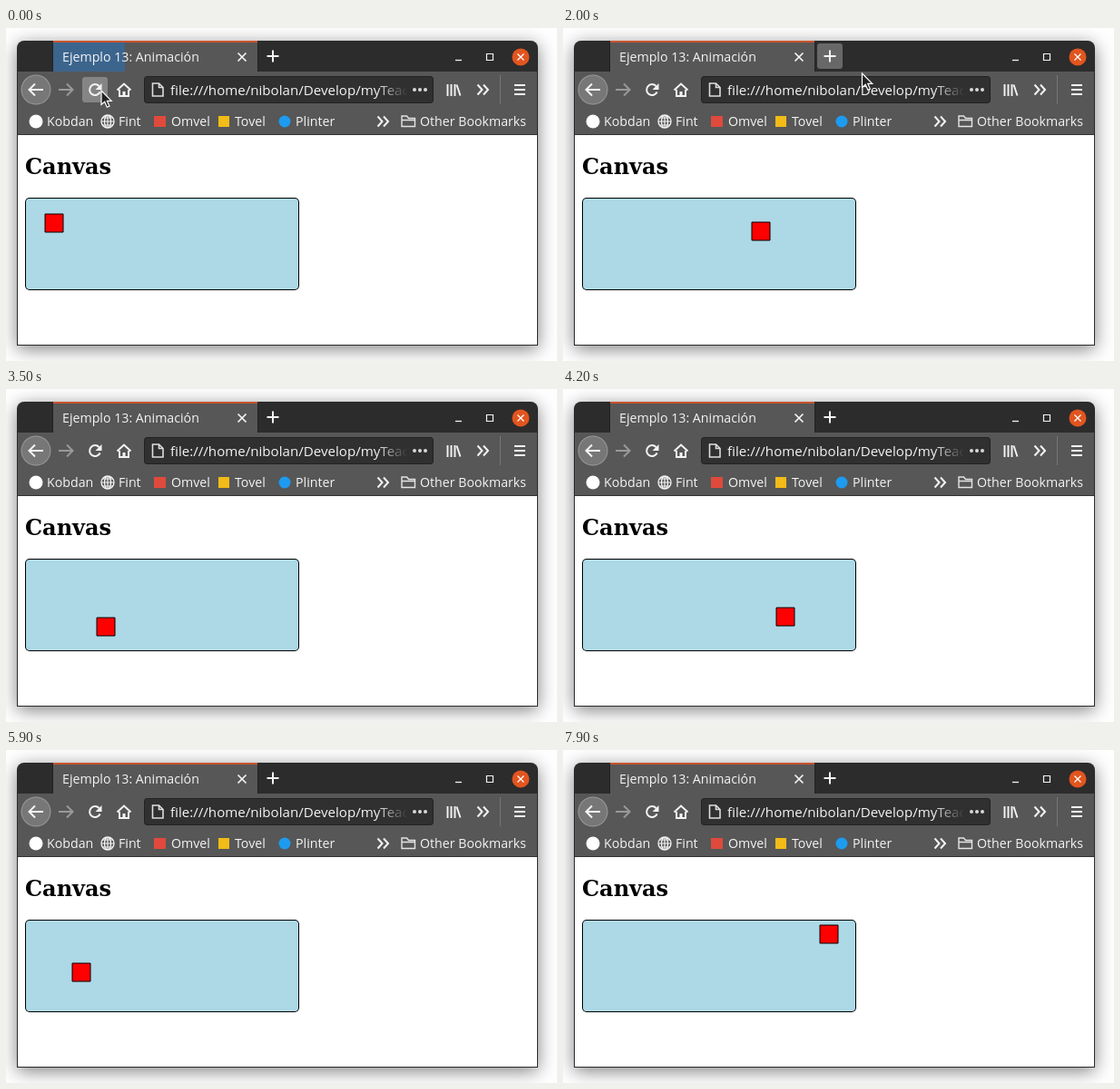
These frames come from a looping animation (607x367 px, 8 s). An HTML page with a canvas:

```html
<!DOCTYPE html>
<html lang="es">
<head>
<meta charset="utf-8">
<title>Ejemplo 13: Animación</title>
<style>
html, body { margin: 0; width: 100%; height: 100%; overflow: hidden; background: #fff; }
canvas { display: block; }
</style>
</head>
<body>
<canvas id="stage" width="607" height="367"></canvas>
<script>
const ctx = document.getElementById('stage').getContext('2d');
const LOOP = 8000, STEP = 100;
const SANS = '"Open Sans", "Noto Sans", sans-serif';
const LIGHT = '#f4f4f4', BAR = '#575757', DARK = '#2c2c2c';

function box(x, y, w, h, r, color) {
  ctx.beginPath();
  ctx.roundRect(x, y, w, h, r);
  if (color) { ctx.fillStyle = color; ctx.fill(); }
}

function disc(x, y, r, color) {
  ctx.beginPath();
  ctx.arc(x, y, r, 0, 7);
  ctx.fillStyle = color;
  ctx.fill();
}

// Strokes an SVG path string
function line(d, color = LIGHT, width = 2) {
  ctx.strokeStyle = color;
  ctx.lineWidth = width;
  ctx.stroke(new Path2D(d));
}

function text(str, x, y, font = '14.2px ' + SANS, color = LIGHT) {
  ctx.font = font;
  ctx.fillStyle = color;
  ctx.fillText(str, x, y);
}

function drawFrame() {
  ctx.fillStyle = '#fff';
  ctx.fillRect(0, 0, 607, 367);
  ctx.save();
  ctx.shadowColor = 'rgba(0,0,0,.5)';
  ctx.shadowBlur = 20;
  ctx.shadowOffsetY = 4;
  box(12, 14, 574, 336, [8, 8, 0, 0], '#2a2a2a');
  ctx.restore();
  box(13, 15, 572, 33, [7, 7, 0, 0], DARK);
  ctx.fillStyle = BAR;
  ctx.fillRect(13, 48, 572, 69);
  ctx.fillStyle = '#333';
  ctx.fillRect(13, 117, 572, 1);
  ctx.fillStyle = '#fff';
  ctx.fillRect(13, 118, 572, 231);
}

function drawTabs(f, plusHover) {
  ctx.fillStyle = BAR;
  ctx.fillRect(52, 15, 225, 33);
  // loading burst sweeping over the tab
  if (f < 3) {
    ctx.fillStyle = `rgba(45,110,175,${[0.62, 0.4, 0.15][f]})`;
    ctx.fillRect(52, 15, f ? 225 : 79, 33);
  }
  ctx.fillStyle = '#c9542c';
  ctx.fillRect(52, 14, 225, 2);
  ctx.fillStyle = '#222';
  ctx.fillRect(51, 16, 1, 32);
  ctx.fillRect(277, 16, 1, 32);
  text('Ejemplo 13: Animación', 62, 37);
  line('M255.5 27.5l9 9m0-9l-9 9', LIGHT, 1.7);
  if (plusHover) box(280, 17, 28, 28, 3, '#686868');
  line('M294 24.5v13M287.5 31h13');

  line('M495 35.5h7', LIGHT, 1.3);
  line('M529.5 28.5h7v7h-7z', LIGHT, 1.2);
  disc(567, 32, 9.5, '#e2551f');
  line('M563.5 28.5l7 7m0-7l-7 7', '#fff', 1.3);
}

function drawToolbar(reloadHover) {
  disc(33, 68, 16.5, '#999');
  disc(33, 68, 15.5, '#777');
  line('M41 68H26M32 61.5L25.5 68l6.5 6.5');
  line('M58 68h15M67 61.5l6.500 6.5-6.5 6.5', '#999');

  if (reloadHover) box(84, 54, 28, 28, 3, '#858585');
  line('M103.6 70.5A6 6 0 1 1 102.500 64');
  ctx.fillStyle = LIGHT;
  ctx.fill(new Path2D('M105.500 61v7h-7z'));

  line('M122.500 68.5L130 61.5l7.500 7M125 68v7h10v-7', LIGHT, 2);
  ctx.fillRect(128.5, 70, 3, 5);

  box(152, 53, 319, 30, 4, '#222');
  box(153, 54, 317, 28, 3, '#303030');
  line('M161.500 61h7l4.500 4.500v9.500h-11.500zM168.500 61v4.500h4.500', '#ddd', 1.6);
  ctx.save();
  ctx.beginPath();
  ctx.rect(178, 54, 264, 28);
  ctx.clip();
  text('file:///home/nibolan/Develop/myTeaching', 181, 74, '15.1px ' + SANS);
  const fade = ctx.createLinearGradient(408, 0, 442, 0);
  fade.addColorStop(0, 'rgba(48,48,48,0)');
  fade.addColorStop(1, '#303030');
  ctx.fillStyle = fade;
  ctx.fillRect(408, 54, 34, 28);
  ctx.restore();
  for (const x of [450, 456, 462]) disc(x, 68, 2, '#d8d8d8');

  line('M486.500 62v13M490.500 62v13M494.500 62v13M496.500 62.500l4 12', LIGHT, 1.9);
  line('M519.500 62.500l5 5.500-5 5.500M526 62.500l5 5.500-5 5.500');
  line('M544.500 52v32', '#777', 1);
  line('M560 63h12M560 68h12M560 73h12');
}

function drawBookmarks(hover) {
  if (hover) box(100, 90, 54, 25, 3, '#808080');
  disc(33, 103, 7.5, '#fff');
  text('Kobdan', 45, 108);

  ctx.beginPath();
  ctx.arc(112, 103, 7, 0, 7);
  ctx.moveTo(115.5, 103);
  ctx.ellipse(112, 103, 3.5, 7, 0, 0, 7);
  ctx.strokeStyle = LIGHT;
  ctx.lineWidth = 1.3;
  ctx.stroke();
  line('M105 103h14M106.500 99h11M106.500 107h11M112 96v14', LIGHT, 1.2);
  text('Fint', 124, 108);

  box(163, 97, 13, 12, 0, '#e04a3c');
  text('Omvel', 182, 108);
  box(234, 97, 12, 12, 0, '#f2bb18');
  text('Tovel', 252, 108);
  disc(307, 103, 6.5, '#1d9bf0');
  text('Plinter', 319, 108);

  line('M409.500 97.500l5 5.500-5 5.500M416 97.500l5 5.500-5 5.500');
  line('M436 108.500v-11.500h5.500l2 2.500h7v9zM436 101.500h14.500', '#e4e4e4', 1.4);
  text('Other Bookmarks', 456, 108);
}

function squareAt(n) {
  let x = 0, y = 10, vx = 3, vy = 1;
  while (n-- > 0) {
    if (x < 0 || x >= 280) vx = -vx;
    if (y <= 0 || y > 80) vy = -vy;
    x += vx;
    y += vy;
  }
  return [x, y];
}

function drawPage(f) {
  text('Canvas', 21, 161, 'bold 24px "DejaVu Serif", serif', '#000');
  box(21, 187, 302, 102, 5, '#000');
  box(22, 188, 300, 100, 4, '#add8e6');
  const n = Math.max(7, 1 + 5 * Math.floor((17 + 12 * f) / 10));
  const [x, y] = squareAt(n);
  ctx.save();
  box(22, 188, 300, 100, 4);
  ctx.clip();
  ctx.beginPath();
  ctx.rect(22 + x, 188 + y, 20, 20);
  ctx.fillStyle = 'red';
  ctx.fill();
  ctx.strokeStyle = '#000';
  ctx.lineWidth = 1;
  ctx.stroke();
  ctx.restore();
}

// Pointer path: step, x, y
const POINTER = [
  [0, 105, 69], [2, 106, 71], [8, 127.5, 100], [9, 129, 103], [11, 180, 135],
  [14, 330, 190], [17, 385, 170], [18, 386, 150], [19, 372, 90],
  [20, 329.5, 50], [22, 63, 18]
];

function pointerAt(f) {
  const i = POINTER.findIndex(p => p[0] >= f);
  if (i < 0) return null;
  if (i === 0) return POINTER[0].slice(1);
  const [a, ax, ay] = POINTER[i - 1], [b, bx, by] = POINTER[i];
  const k = (f - a) / (b - a);
  return [ax + (bx - ax) * k, ay + (by - ay) * k];
}

function drawPointer([x, y]) {
  ctx.save();
  ctx.translate(x, y);
  const arrow = new Path2D('M0 0V15.500L3.700 12.200 6.300 18.200 8.900 17.100 6.300 11.300H11.200Z');
  ctx.fillStyle = '#222';
  ctx.fill(arrow);
  ctx.strokeStyle = '#fff';
  ctx.lineWidth = 1.2;
  ctx.stroke(arrow);
  ctx.restore();
}

function draw(now) {
  const f = Math.floor((now % LOOP) / STEP);
  const p = pointerAt(f);
  const over = (x, y, w, h) => !!p && p[0] >= x && p[0] < x + w && p[1] >= y && p[1] < y + h;
  drawFrame();
  drawTabs(f, f === 20);
  drawToolbar(over(84, 54, 28, 28));
  drawBookmarks(over(100, 90, 54, 25));
  drawPage(f);
  if (p) drawPointer(p);
}

const start = performance.now();
function tick() {
  draw(performance.now() - start);
  requestAnimationFrame(tick);
}
tick();
</script>
</body>
</html>
```
